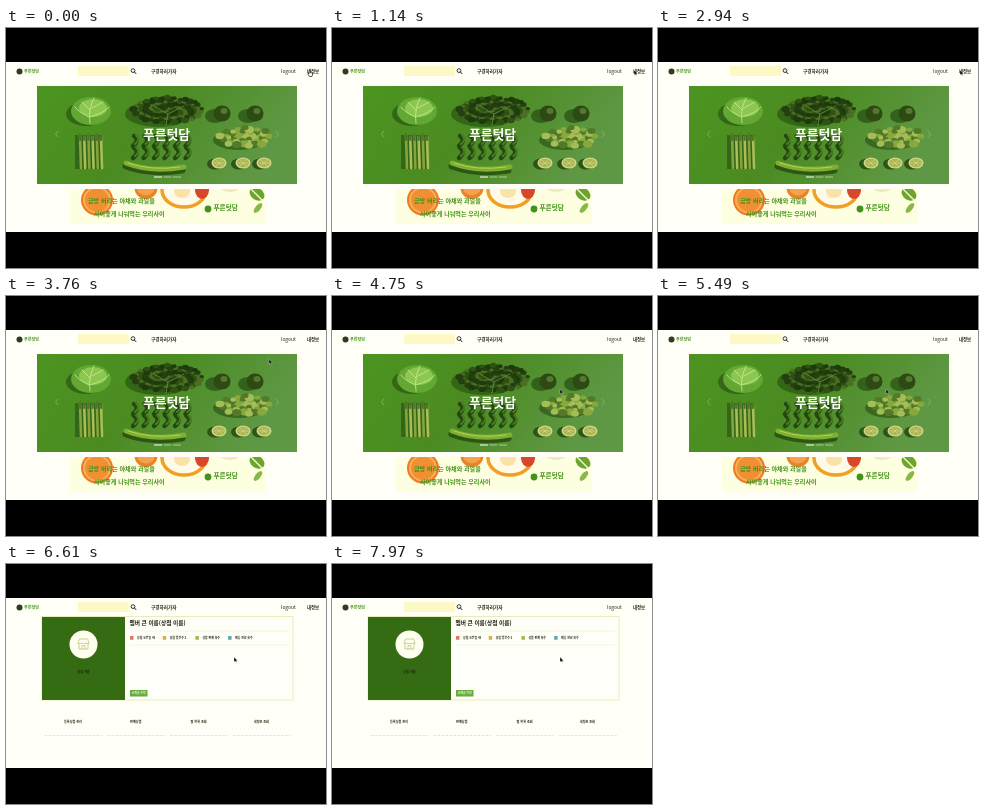
Animation, 320 px wide and 240 px high, one loop 7990 ms. Source, as an HTML page:

```html
<!DOCTYPE html>
<html lang="ko">
<head>
<meta charset="utf-8">
<style>
html, body { margin: 0; width: 100%; height: 100%; overflow: hidden; background: #000; }
svg { display: block; width: 100vw; height: 100vh; font-family: "Noto Sans CJK KR", "Noto Sans CJK", "Noto Sans", sans-serif; font-weight: 700; }
</style>
</head>
<body>
<svg id="stage" viewBox="0 0 320 240">
  <defs>
    <linearGradient id="table" x2="1" y2=".3">
      <stop offset="0" stop-color="#4c9420"/>
      <stop offset=".5" stop-color="#4b8b22"/>
      <stop offset="1" stop-color="#5f9844"/>
    </linearGradient>
    <clipPath id="heroClip"><rect x="31" y="58" width="260" height="98"/></clipPath>
    <clipPath id="stripClip"><rect x="64" y="161" width="196" height="35"/></clipPath>
  </defs>
  <rect width="320" height="240"/>
  <rect y="34" width="320" height="170" fill="#fffff7"/>
  <g id="header"></g>
  <g id="home">
    <g id="hero" clip-path="url(#heroClip)"></g>
    <g id="strip" clip-path="url(#stripClip)"></g>
  </g>
  <g id="shop"></g>
  <g id="cursor">
    <path id="arrow" d="M0 0V5L1.2 4L2 5.6L2.8 5.2L2.1 3.7H3.6Z" fill="#111" stroke="#fff" stroke-width=".3"/>
    <path id="hand" d="M1 0H2V2.5L4.5 3V5L3.8 6.5H1.5L0 4.4V3.4L1 4Z" fill="#fff" stroke="#111" stroke-width=".7"/>
  </g>
</svg>
<script>
const LOOP = 7990, SHOP_AT = 6410, BRAND = '푸른텃담';
const INK = '#22250f', LEAF = '#43921a';
const $ = id => document.getElementById(id);

function add(parent, tag, attrs, content) {
  const el = document.createElementNS('http://www.w3.org/2000/svg', tag);
  for (const key in attrs) el.setAttribute(key, attrs[key]);
  if (content) el.textContent = content;
  parent.append(el);
  return el;
}
const rect = (g, x, y, width, height, fill, more) => add(g, 'rect', { x, y, width, height, fill, ...more });
const oval = (g, cx, cy, rx, ry, fill, more) => add(g, 'ellipse', { cx, cy, rx, ry, fill, ...more });
const line = (g, d, stroke, width, more) =>
  add(g, 'path', { d, fill: 'none', stroke, 'stroke-width': width, 'stroke-linecap': 'round', ...more });
const label = (g, x, y, size, content, more) =>
  add(g, 'text', { x, y, 'font-size': size, fill: INK, ...more }, content);

function random(seed) {
  return () => (seed = seed * 16807 % 2147483647) / 2147483647;
}

// Overlapping ovals spread evenly over an elliptical area.
function cluster(g, count, cx, cy, rx, ry, size, colors) {
  const rnd = random(29);
  for (let i = 0; i < count; i++) {
    const angle = i * 2.4, reach = Math.sqrt(i / count), scale = size * (.7 + rnd() * .6);
    oval(g, cx + Math.cos(angle) * reach * rx, cy + Math.sin(angle) * reach * ry,
      scale, scale * .75, colors[i % colors.length]);
  }
}

function drawHeader(g) {
  oval(g, 13.5, 43.5, 3, 3, '#2f3d1c');
  label(g, 18, 45, 4.1, BRAND, { fill: LEAF });
  rect(g, 72, 38, 51, 10, '#fcf9c6');
  oval(g, 127, 42.6, 1.9, 1.9, 'none', { stroke: '#222', 'stroke-width': .9 });
  line(g, 'M128.4 44L130 45.7', '#222', 1);
  label(g, 145, 45, 4.6, '구경하러가자');
  label(g, 275, 45, 4.9, 'logout', { 'font-weight': 500 });
  label(g, 301, 45, 4.4, '내정보');
}

function drawHero(g) {
  rect(g, 31, 58, 260, 98, 'url(#table)');

  oval(g, 80, 86, 20, 12, '#234d12', { opacity: .6 });
  oval(g, 85, 83, 20, 14, '#62a832');
  oval(g, 87, 80, 14, 9, '#8cc750');
  line(g, 'M84 95Q82 82 88 70M83 89Q71 83 69 79M84 89Q98 85 103 79M84 82L76 74M86 80L97 74', '#cdea9c', .8);

  oval(g, 152, 86, 33, 13, '#234d12', { opacity: .6 });
  cluster(g, 130, 162, 82, 35, 13, 3.2, ['#1d3a0c', '#2f5213', '#4a6f24', '#243f10']);
  line(g, 'M160 97L162 86L148 78M162 86L178 78', '#6d9440', .8);

  for (const x of [216, 249]) {
    oval(g, x - 7, 88, 10, 7, '#234d12', { opacity: .7 });
    oval(g, x, 85.5, 8.5, 8, '#2c4a12');
    oval(g, x + 2, 83, 3.5, 3, '#557830');
  }

  rect(g, 69, 107, 27, 34, '#234d12', { opacity: .6 });
  for (let i = 0; i < 6; i++) {
    const x = 75 + i * 4.2;
    line(g, `M${x - 1} ${107 + i % 2 * 2}L${x} 140`, i % 2 ? '#a9bd58' : '#85a53c', 2.6);
    line(g, `M${x - 1} ${106 + i % 2 * 2}V112`, '#55722b', 2.2);
  }

  for (let i = 0; i < 12; i++) {
    const x = 129 + i % 6 * 10.5, y = i < 6 ? 108 : 120;
    line(g, `M${x - 1} ${y}Q${x + 5} ${y + 4} ${x - 2} ${y + 10}`, '#234911', 4.4);
    line(g, `M${x + 1} ${y - 1}Q${x + 6} ${y + 4} ${x} ${y + 8}`, '#487d1f', 2.2);
  }
  line(g, 'M120 138Q145 147 176 142', '#2b5714', 7);
  line(g, 'M120 135Q145 145 178 139', '#7eaf2f', 5);
  line(g, 'M122 135Q145 143 174 139', '#b6cf58', 1);

  oval(g, 233, 112, 26, 10, '#234d12', { opacity: .6 });
  cluster(g, 40, 239, 109, 26, 10, 3.8, ['#54792a', '#86a93e', '#a5bd56']);

  for (const x of [213, 237, 258]) {
    oval(g, x - 4, 136, 8, 5.5, '#2d5518');
    oval(g, x, 135, 7.5, 5.5, '#d5d58a');
    oval(g, x, 135, 6, 4.2, '#a9b750');
    line(g, `M${x - 5} 135H${x + 5}M${x - 3} 132L${x + 3} 138M${x + 3} 132L${x - 3} 138`, '#dedea0', .5);
  }

  line(g, 'M52 103L49.5 106L52 109M270 103L272.5 106L270 109', '#93b974', .7);
  label(g, 160.5, 111, 12.8, BRAND, { fill: '#fffffa', 'text-anchor': 'middle', 'font-weight': 900 });
  for (let i = 0; i < 3; i++) rect(g, 148 + i * 9.5, 148.5, 8, 1, '#fff', { opacity: i ? .5 : 1 });
}

function drawStrip(g) {
  rect(g, 64, 161, 196, 35, '#fefee0');
  oval(g, 91, 172, 16, 15.5, '#f07a20');
  oval(g, 91, 172, 14, 13.5, '#f6b05a');
  oval(g, 91, 172, 12, 11.5, '#f19032');
  oval(g, 140, 160, 11.5, 11, '#ed8126');
  oval(g, 140, 159, 9, 8.5, '#f5a24e');
  oval(g, 178, 162, 22, 17, '#fffbe8', { stroke: '#f2a024', 'stroke-width': 3.5 });
  oval(g, 176, 163, 8, 7, '#fbe3a8');
  oval(g, 196, 162, 7, 9, '#d9472b');
  oval(g, 224, 160, 9, 4, '#f4eab8');
  oval(g, 251, 166, 8, 6, '#6ca52c', { transform: 'rotate(35 251 166)' });
  oval(g, 252, 180, 6, 2.6, '#89b84a', { transform: 'rotate(-50 252 180)' });
  line(g, 'M244 160L256 172', '#f2f8d8', 1.4);
  label(g, 82, 174.8, 6.1, '금방 버리는 야채와 과일을', { fill: LEAF });
  label(g, 88, 187.8, 6.1, '사이좋게 나눠먹는 우리사이', { fill: LEAF });
  oval(g, 202, 181, 3.4, 3.4, LEAF);
  label(g, 207.5, 182.3, 6.6, BRAND, { fill: LEAF });
}

function drawShop(g) {
  const center = { 'text-anchor': 'middle' };
  rect(g, 36, 52.5, 251, 83.5, '#fffff9', { stroke: '#e3e3a2', 'stroke-width': .7 });
  rect(g, 36, 53, 83, 83, '#356b12');
  oval(g, 77.5, 80.5, 14, 14, '#fffff0');
  line(g, 'M73 80V85H82V80M72 79L73.5 75H81.5L83 79ZM76 85V81.5H79V85', '#c6c37d', .8);
  label(g, 77.5, 109, 3.1, '상점 이름', { ...center, fill: '#14280a' });
  label(g, 123.5, 60.6, 5.7, '멤버 큰 이름(상점 이름)');
  line(g, 'M124 67H283M124 81H283', '#efefbd', .6);
  [['상점 오픈일 43', '#df7858'], ['상점 방문수 2', '#dda852'],
   ['상품 판매 횟수', '#a4b84a'], ['배송 완료 횟수', '#5eaaa9']].forEach(([text, color], i) => {
    const x = 124 + i * 32.7;
    rect(g, x, 72, 3.5, 3.8, color, { rx: .6 });
    label(g, x + 7, 75.2, 2.9, text);
  });
  rect(g, 124, 126, 17.5, 6.5, '#64ac3c');
  label(g, 132.7, 130.4, 2.9, '소개글 수정', { ...center, fill: '#f4ffe8' });
  ['등록상품 관리', '판매상품', '찜 목록 조회', '내정보 조회'].forEach((text, i) => {
    const x = 67 + i * 62.8;
    label(g, x, 159.3, 3.1, text, center);
    line(g, `M${x - 28} 171.5H${x + 29}`, '#e2dfa0', .7, { 'stroke-dasharray': '2 2' });
  });
}

const path = [[0, 302, 42], [3360, 302, 42], [3760, 263, 63], [4090, 228, 93], [LOOP, 228, 93]];

function cursorAt(t) {
  const i = path.findIndex(p => p[0] > t);
  const [t0, x0, y0] = path[i - 1], [t1, x1, y1] = path[i];
  const k = (t - t0) / (t1 - t0);
  return [x0 + (x1 - x0) * k, y0 + (y1 - y0) * k];
}

function update(t) {
  const inShop = t >= SHOP_AT, pointing = t < 120;
  $('home').style.display = inShop ? 'none' : '';
  $('shop').style.display = inShop ? '' : 'none';
  $('hand').style.display = pointing ? '' : 'none';
  $('arrow').style.display = pointing ? 'none' : '';
  $('cursor').setAttribute('transform', `translate(${cursorAt(t)})`);
}

drawHeader($('header'));
drawHero($('hero'));
drawStrip($('strip'));
drawShop($('shop'));

const start = performance.now();
function tick() {
  update((performance.now() - start) % LOOP);
  requestAnimationFrame(tick);
}
update(0);
requestAnimationFrame(tick);
</script>
</body>
</html>
```
